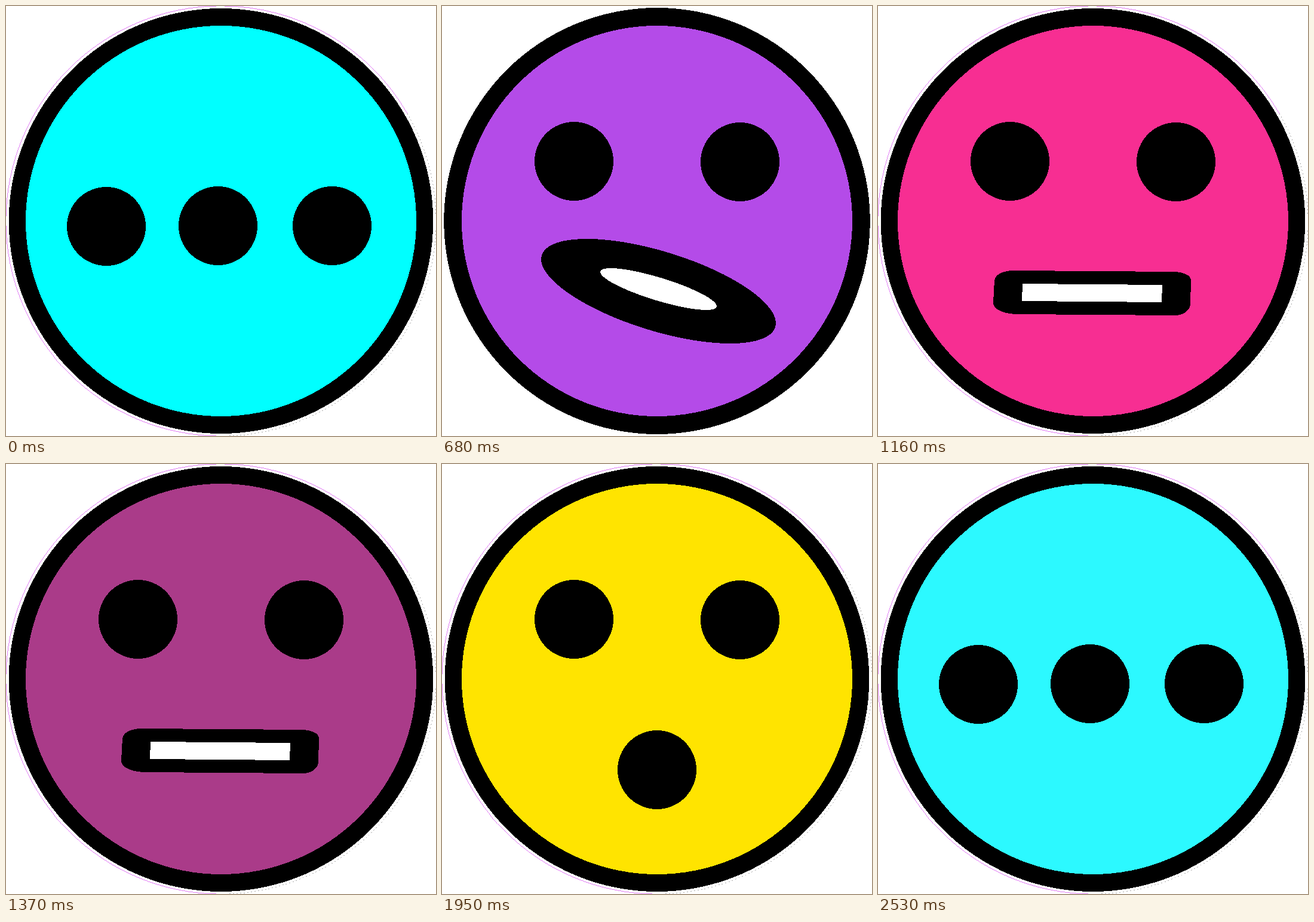
Animation of 720x720 px, one loop 2730 ms. Source, as an HTML page:

```html
<!DOCTYPE html>
<html lang="en">
<head>
<meta charset="utf-8">
<title>Changing moods</title>
<style>
  html, body { margin: 0; width: 100%; height: 100%; overflow: hidden; background: #fff; }
  svg { display: block; width: 100vw; height: 100vh; shape-rendering: crispEdges; }
  .mood { display: none; }
  .mood.on { display: inline; }
</style>
</head>
<body>
<svg viewBox="0 0 720 720">
  <g id="halo" fill="none" stroke-width=".6">
    <path d="M360 720.2A360.2 360.2 0 0 1 360 -.2A360.2 360.2 0 0 1 672 180" stroke="#d02cf0"/>
    <path d="M672 180A360.2 360.2 0 0 1 360 720.2" stroke="#777" stroke-dasharray="2 4"/>
  </g>
  <ellipse id="ring" cx="360" cy="360" rx="355.3" ry="356"/>
  <circle id="skin" cx="360" cy="360" r="327"/>
  <g id="eyes">
    <circle cx="221" cy="260" r="66"/>
    <circle cx="499" cy="261" r="66"/>
  </g>
  <g class="mood">
    <circle cx="168" cy="369" r="66"/>
    <circle cx="355" cy="368" r="66"/>
    <circle cx="546" cy="368" r="66"/>
  </g>
  <path class="mood" d="M148 527C148 511 155 499 165 489C208 445 279 423 355 423C437 423 509 447 553 492C566 506 572 521 572 537C572 559 556 574 537 574C525 574 515 568 508 558C479 524 421 508 358 508C299 508 242 523 212 557C205 567 197 572 184 572C160 572 148 551 148 527Z"/>
  <g class="mood">
    <ellipse rx="204.5" ry="66.6" transform="translate(362.5 477.5) rotate(17.1)"/>
    <ellipse rx="101.8" ry="19.2" transform="translate(362.5 474) rotate(17)" fill="#fff"/>
  </g>
  <g class="mood">
    <path d="M195 459C197 449 210 443 227 443L498 445C512 446 524 451 524 459L523 500C522 511 510 518 498 518L230 516C210 515 193 508 193 497Z"/>
    <path d="M242 465L476 467L475 496L241 494Z" fill="#fff"/>
  </g>
  <path class="mood" d="M150 528C157 508 160 498 164 490L194 432C203 416 209 412 215 406C229 394 248 383 264 382C278 383 284 393 289 406C297 428 320 450 350 450C372 449 390 443 398 436C419 420 437 382 462 378C482 379 509 405 522 427C534 448 546 470 555 491C562 507 571 516 571 527C570 533 573 540 567 543C553 550 536 549 526 542L504 523C484 537 474 546 455 548C432 550 430 542 408 526C392 540 386 549 364 549C337 549 333 541 315 527C297 543 291 550 270 550C244 549 239 538 219 526C200 540 196 550 177 550C163 551 152 546 152 540C150 534 149 533 150 528Z"/>
  <circle class="mood" cx="360" cy="512" r="66"/>
</svg>
<script>
const LOOP = 2730, LAST = 48, STEP = 2530 / LAST;
const DOTS = 0, TILTED = 2;
// Skin colours by step, blended in between
const skinKeys = [
  [0, 0, 255, 255], [7, 228, 85, 255], [18, 140, 67, 212], [22, 247, 46, 146],
  [30, 92, 71, 127], [37, 255, 228, 0], [LAST, 44, 249, 255]
];
const byId = id => document.getElementById(id);
const moods = [...document.querySelectorAll(".mood")];

function skinAt(step) {
  const next = Math.max(1, skinKeys.findIndex(key => key[0] >= step));
  const [from, ...a] = skinKeys[next - 1];
  const [to, ...b] = skinKeys[next];
  const k = (step - from) / (to - from);
  return `rgb(${a.map((v, i) => Math.round(v + (b[i] - v) * k))})`;
}

function draw(time) {
  const step = Math.min(LAST, Math.floor((time % LOOP + 5) / STEP));
  const mood = Math.floor((step + 1) / 7) % 7 % moods.length;
  const tilted = mood === TILTED;
  moods.forEach((el, i) => el.classList.toggle("on", i === mood));
  byId("eyes").style.display = mood === DOTS ? "none" : "";
  byId("halo").style.display = tilted ? "none" : "";
  byId("ring").setAttribute("rx", tilted ? 356.8 : 355.3);
  byId("ring").setAttribute("ry", tilted ? 357 : 356);
  byId("skin").setAttribute("fill", skinAt(step));
}

const start = performance.now();
function tick() {
  draw(performance.now() - start);
  requestAnimationFrame(tick);
}
tick();
</script>
</body>
</html>
```
